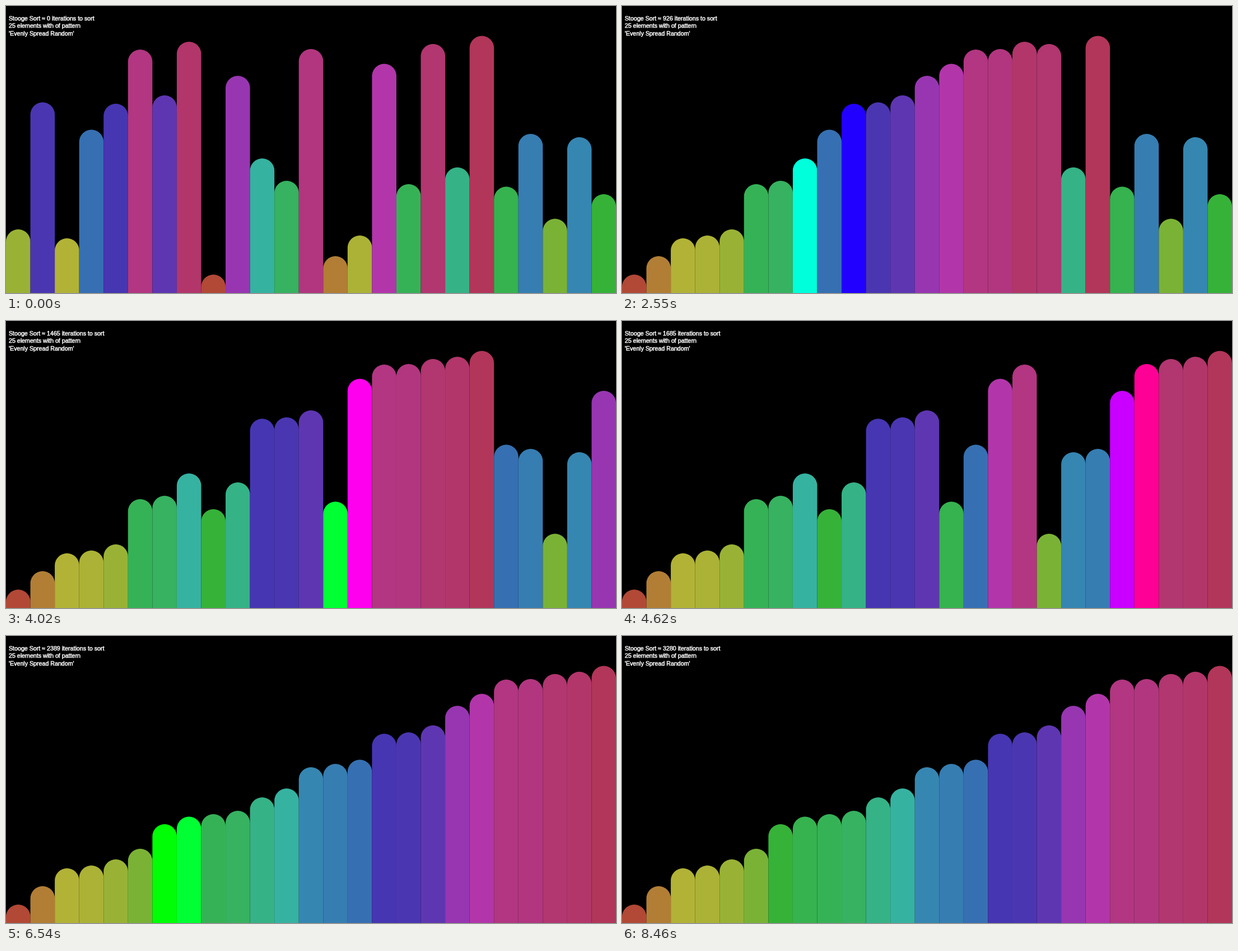
An HTML page for the animation above (9 s loop, 1089 by 514 pixels).

```html
<!DOCTYPE html>
<html lang="en">
<head>
<meta charset="utf-8">
<title>Stooge Sort</title>
<style>
  html, body { margin: 0; width: 100%; height: 100%; overflow: hidden; background: #000; }
  svg { display: block; width: 1089px; height: 514px; }
  text { font-family: "Liberation Sans", Arial, sans-serif; font-size: 10.67px; fill: #fff; stroke: #fff; stroke-width: .5px; }
</style>
</head>
<body>
<svg viewBox="0 0 1089 514">
  <rect width="1089" height="514"/>
  <g id="bars"></g>
  <text id="count" x="5" y="26"></text>
  <text x="5" y="39.3">25 elements with of pattern</text>
  <text x="5" y="52.6">'Evenly Spread Random'</text>
</svg>
<script>
const WIDTH = 1089, HEIGHT = 514, STEP = 30, LOOP = 9000, LAST_TICK = 282;
const tops = [400, 172.5, 416, 221.5, 175, 78, 160, 64, 481, 125, 273, 313, 77,
  448, 411, 103.5, 319, 68, 289, 53.5, 323.5, 229, 381, 235, 337];
const barWidth = WIDTH / tops.length, radius = barWidth / 2;

// One entry per recursive call: the compared pair and the order after it.
const steps = [{ pair: [], order: tops.slice() }];
function stoogeSort(list, i, j) {
  if (list[i] < list[j]) [list[i], list[j]] = [list[j], list[i]];
  steps.push({ pair: [i, j], order: list.slice() });
  const size = j - i + 1;
  if (size < 3) return;
  const third = Math.floor(size / 3);
  stoogeSort(list, i, j - third);
  stoogeSort(list, i + third, j);
  stoogeSort(list, i, j - third);
}
stoogeSort(tops.slice(), 0, tops.length - 1);
const total = steps.length - 1;
steps[total].pair = [];

const bars = tops.map(() => document.getElementById("bars").appendChild(
  document.createElementNS("http://www.w3.org/2000/svg", "path")));
const count = document.getElementById("count");

function iterationsAt(tick) {
  if (tick < 3) return Math.min(tick, 1);
  // Steady pace, then a faster finish.
  return Math.min(total, Math.max(11 * tick - 9, total - 20 * (LAST_TICK - tick)));
}

function barPath(index, top) {
  const x = index * barWidth;
  return `M${x} ${HEIGHT}V${top + radius}a${radius} ${radius} 0 0 1 ${barWidth} 0V${HEIGHT}Z`;
}

function barColor(top, active) {
  const hue = 0.782 * (HEIGHT - top) - 17;
  return active ? `hsl(${hue}, 100%, 50%)` : `hsl(${hue}, 53.8%, 45.5%)`;
}

let shown = -1;
function render(time) {
  const n = iterationsAt(Math.floor(time % LOOP / STEP));
  if (n === shown) return;
  shown = n;
  const { pair, order } = steps[n];
  bars.forEach((bar, i) => {
    bar.setAttribute("d", barPath(i, order[i]));
    bar.setAttribute("fill", barColor(order[i], pair.includes(i)));
  });
  count.textContent = `Stooge Sort ≈ ${n} iterations to sort`;
}

const start = performance.now();
function loop() {
  render(performance.now() - start);
  requestAnimationFrame(loop);
}
loop();
</script>
</body>
</html>
```
